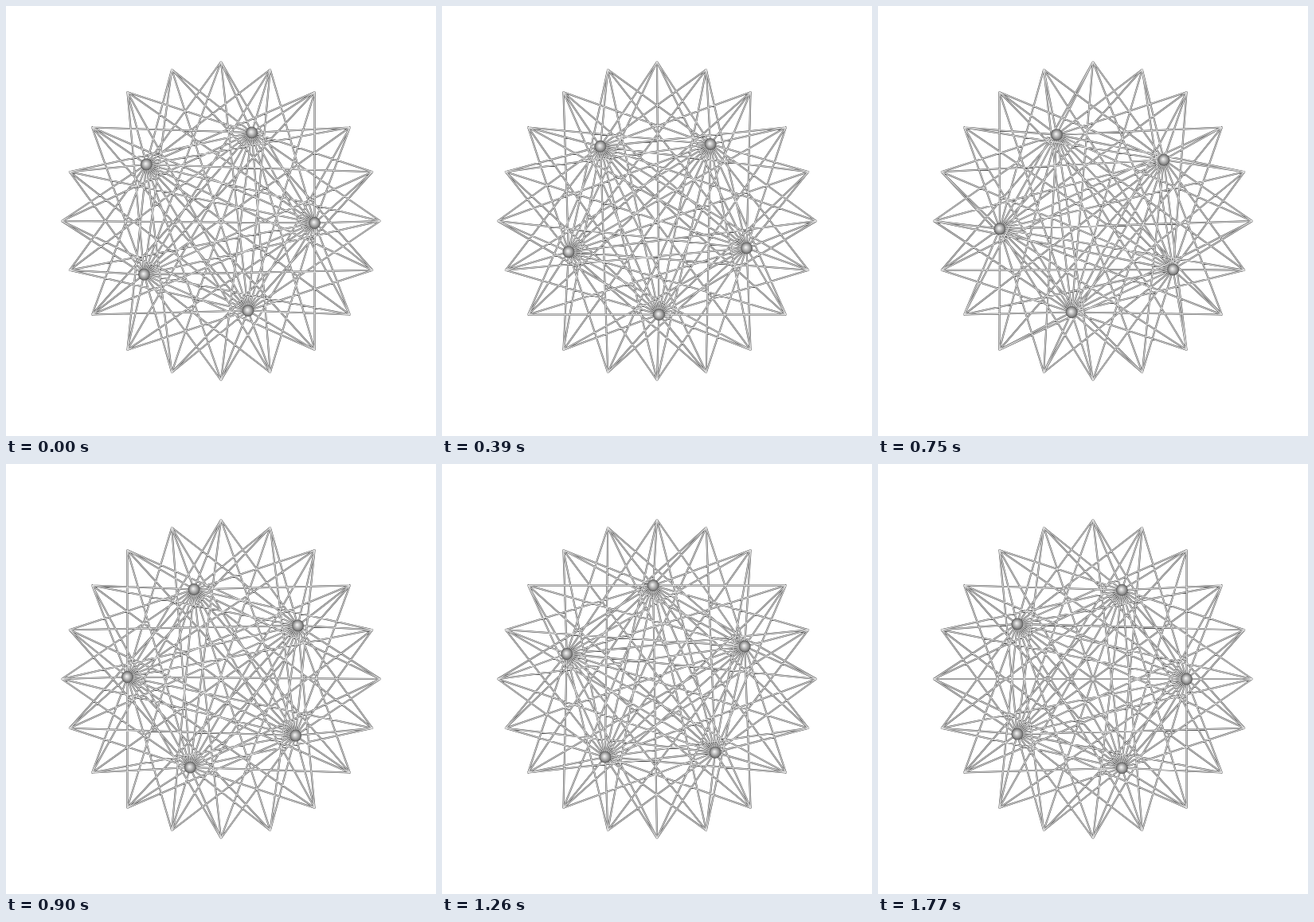
An HTML page with a canvas that plays this animation: 540x540 px, repeating every 1.8 s.

```html
<!DOCTYPE html>
<html lang="en">
<head>
<meta charset="utf-8">
<title>Rotating hubs</title>
<style>
  html, body { margin: 0; width: 100%; height: 100%; overflow: hidden; background: #fff; }
  canvas { display: block; width: 540px; height: 540px; }
</style>
</head>
<body>
<canvas id="stage" width="540" height="540"></canvas>
<script>
const ctx = document.getElementById('stage').getContext('2d');
const CENTER = 270, LOOP = 1800, STEP = 30, STEPS = LOOP / STEP;
const TAU = Math.PI * 2;
const RIM = 200;
const HUB_ORBIT = RIM * Math.cos(TAU * 0.15); // touches the chords spanning six rim points
const BALL = 7.5;

const ring = (count, radius, turn) => Array.from({ length: count }, (_, i) => {
  const a = TAU * (i / count + turn);
  return [CENTER + radius * Math.cos(a), CENTER + radius * Math.sin(a)];
});

const tips = ring(20, RIM, 0);

// Shared ridges stay light where tubes cross, so each layer is stroked for all tubes at once.
const layers = [[2.1, '#505050'], [1.3, '#858585'], [0.75, '#efefef']];

function drawTubes(hubs) {
  const path = new Path2D();
  for (const hub of hubs) {
    for (const tip of tips) {
      path.moveTo(...hub);
      path.lineTo(...tip);
    }
  }
  ctx.lineCap = 'round';
  for (const [width, color] of layers) {
    ctx.lineWidth = width;
    ctx.strokeStyle = color;
    ctx.stroke(path);
  }
}

function drawBall([x, y]) {
  const shade = ctx.createRadialGradient(x - 1, y - 1, 0, x, y, BALL);
  shade.addColorStop(0, '#f6f6f6');
  shade.addColorStop(0.35, '#c8c8c8');
  shade.addColorStop(0.75, '#8a8a8a');
  shade.addColorStop(1, '#555');
  ctx.fillStyle = shade;
  ctx.beginPath();
  ctx.arc(x, y, BALL, 0, TAU);
  ctx.fill();
}

function draw(time) {
  const step = Math.floor((time % LOOP) / STEP);
  const hubs = ring(5, HUB_ORBIT, (step + 1) / STEPS / 5);
  ctx.fillStyle = '#fff';
  ctx.fillRect(0, 0, 540, 540);
  drawTubes(hubs);
  hubs.forEach(drawBall);
}

let start;
function tick(now) {
  start ??= now;
  draw(Math.max(0, now - start));
  requestAnimationFrame(tick);
}
draw(0);
requestAnimationFrame(tick);
</script>
</body>
</html>
```
